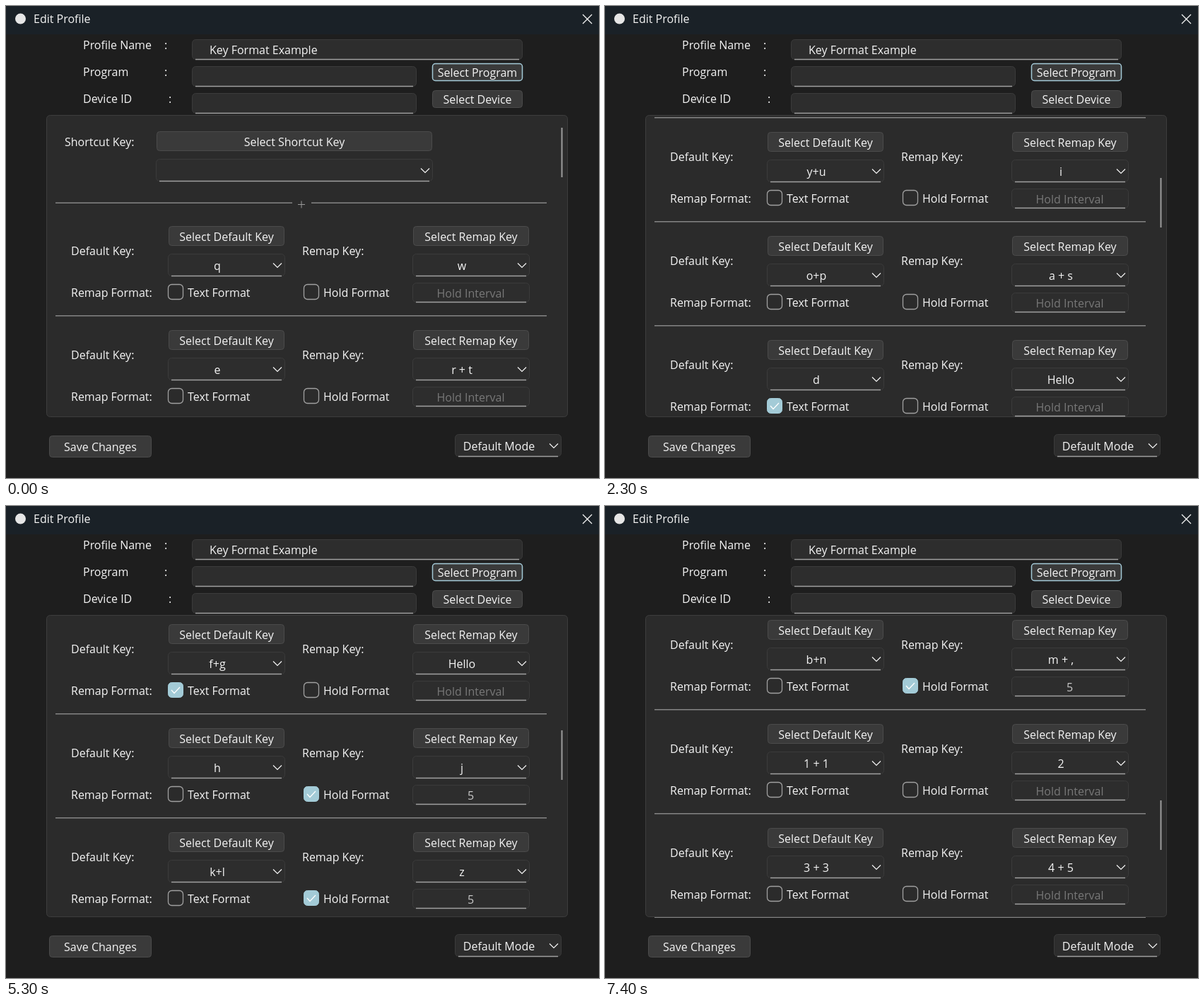
These frames come from a looping animation (839 px wide and 667 px high, 8 s). An HTML page with a canvas:

```html
<!DOCTYPE html>
<html lang="en">
<head>
<meta charset="utf-8">
<title>Edit Profile</title>
<style>
  html, body { margin: 0; height: 100%; overflow: hidden; background: #1e1e1e; }
  canvas { display: block; }
</style>
</head>
<body>
<canvas width="839" height="667"></canvas>
<script>
const ctx = document.querySelector('canvas').getContext('2d');
const LOOP = 8000, ROW_HEIGHT = 147;
const INK = '#f4f4f4', UNDERLINE = '#a0a0a0';

// [start time, scroll offset]
const STOPS = [[0, 0], [500, 427], [3500, 879], [6500, 1473]];

// [default key, remap key, format, hold interval]
const ROWS = [
  ['q', 'w'], ['e', 'r + t'], ['y+u', 'i'], ['o+p', 'a + s'],
  ['d', 'Hello', 'text'], ['f+g', 'Hello', 'text'],
  ['h', 'j', 'hold', '5'], ['k+l', 'z', 'hold', '5'], ['x+c', 'v', 'hold', '5'],
  ['b+n', 'm + ,', 'hold', '5'], ['1 + 1', '2'], ['3 + 3', '4 + 5'], ['6', '7']
];

function text(str, x, y, align = 'left', color = INK) {
  ctx.font = '16px "Open Sans", "Noto Sans", sans-serif';
  ctx.textAlign = align;
  ctx.fillStyle = color;
  ctx.fillText(str, x, y + 6);
}

function box(x, y, w, h, fill, border, radius = 5, width = 1) {
  ctx.beginPath();
  ctx.roundRect(x + .5, y + .5, w - 1, h - 1, radius);
  ctx.fillStyle = fill;
  ctx.fill();
  ctx.strokeStyle = border;
  ctx.lineWidth = width;
  ctx.stroke();
}

function path(points, color = INK, width = 1.3) {
  ctx.beginPath();
  points.forEach(([x, y]) => ctx.lineTo(x, y));
  ctx.strokeStyle = color;
  ctx.lineWidth = width;
  ctx.stroke();
}

function button(label, x, y, w, h, focused) {
  box(x, y, w, h, '#3a3a3a', focused ? '#a3c9d6' : '#4b4b4b', 4, focused ? 1.5 : 1);
  text(label, x + w / 2, y + h / 2 + .5, 'center');
}

function field(x, y, w, h) {
  box(x, y, w, h, '#2d2d2d', '#3b3b3b');
  path([[x + 5, y + h - .5], [x + w - 5, y + h - .5]], UNDERLINE, 1.4);
}

function combo(label, x, y, w, h = 32) {
  field(x, y, w, h);
  text(label, x + w / 2 - 13, y + h / 2 + 1, 'center');
  const cx = x + w - 11, cy = y + h / 2 + .5;
  path([[cx - 6, cy - 3], [cx, cy + 3], [cx + 6, cy - 3]], INK, 1.2);
}

function checkbox(label, x, y, checked) {
  box(x, y, 22, 22, checked ? '#a3cbd7' : '#2b2b2b', checked ? '#a3cbd7' : '#a0a0a0', 5, checked ? 1 : 1.3);
  if (checked) path([[x + 5, y + 11], [x + 9, y + 15.5], [x + 17, y + 7]], '#fff', 1.2);
  text(label, x + 28, y + 11.5);
}

function separator(x1, x2, y) {
  path([[x1, y], [x2, y]], '#858585', 1.6);
}

function drawRow([key, remap, format, interval], y) {
  text('Default Key:', 92, y + 21);
  text('Remap Key:', 419, y + 21);
  text('Remap Format:', 92, y + 80);
  button('Select Default Key', 230, y - 14, 164, 28);
  button('Select Remap Key', 576, y - 14, 164, 28);
  combo(key, 229, y + 25, 166);
  combo(remap, 575, y + 25, 166);
  checkbox('Text Format', 229, y + 68, format === 'text');
  checkbox('Hold Format', 421, y + 68, format === 'hold');
  field(575, y + 66, 166, 28);
  text(interval || 'Hold Interval', 657.5, y + 81, 'center', interval ? '#c8c8c8' : '#787878');
  separator(70, 765, y + 112.8);
}

function drawPanel(scroll) {
  box(57, 154, 738, 427, '#2b2b2b', '#3d3d3d', 5);
  ctx.save();
  ctx.beginPath();
  ctx.rect(58, 155, 736, 427);
  ctx.clip();
  ctx.translate(0, -scroll);
  text('Shortcut Key:', 83, 191.5);
  button('Select Shortcut Key', 213, 177, 390, 28);
  combo('', 212, 216, 392);
  separator(70, 405, 278.3);
  separator(432, 765, 278.3);
  path([[413, 280.5], [423, 280.5]], '#999', 1);
  path([[418, 275.5], [418, 285.5]], '#999', 1);
  ROWS.forEach((row, i) => drawRow(row, 325 + i * ROW_HEIGHT));
  ctx.restore();
  const thumbY = Math.round(172 + scroll * .1654);
  path([[786.5, thumbY], [786.5, thumbY + 70]], '#9c9c9c', 2);
}

function drawWindow() {
  ctx.fillStyle = '#1e1e1e';
  ctx.fillRect(0, 0, 839, 667);
  ctx.fillStyle = '#1a2127';
  ctx.fillRect(0, 0, 839, 40);
  ctx.beginPath();
  ctx.arc(20.5, 18, 7.5, 0, 2 * Math.PI);
  ctx.fillStyle = '#e6e6e6';
  ctx.fill();
  text('Edit Profile', 39, 18);
  path([[816, 12], [829, 25]]);
  path([[829, 12], [816, 25]]);

  [['Profile Name', 54.5, 224], ['Program', 93, 224], ['Device ID', 130.5, 230]].forEach(([label, y, colon]) => {
    text(label, 109, y);
    text(':', colon, y);
  });
  field(263, 47, 468, 29);
  text('Key Format Example', 288, 62);
  field(263, 85, 318, 29);
  field(263, 123, 318, 29);
  button('Select Program', 603, 81, 128, 25, true);
  button('Select Device', 603, 119, 128, 25);
  button('Save Changes', 61, 607, 145, 31);
  combo('Default Mode', 635, 605, 151);
}

function draw() {
  const time = performance.now() % LOOP;
  const [, scroll] = STOPS.findLast(([start]) => time >= start);
  drawWindow();
  drawPanel(scroll);
  requestAnimationFrame(draw);
}
draw();
</script>
</body>
</html>
```
